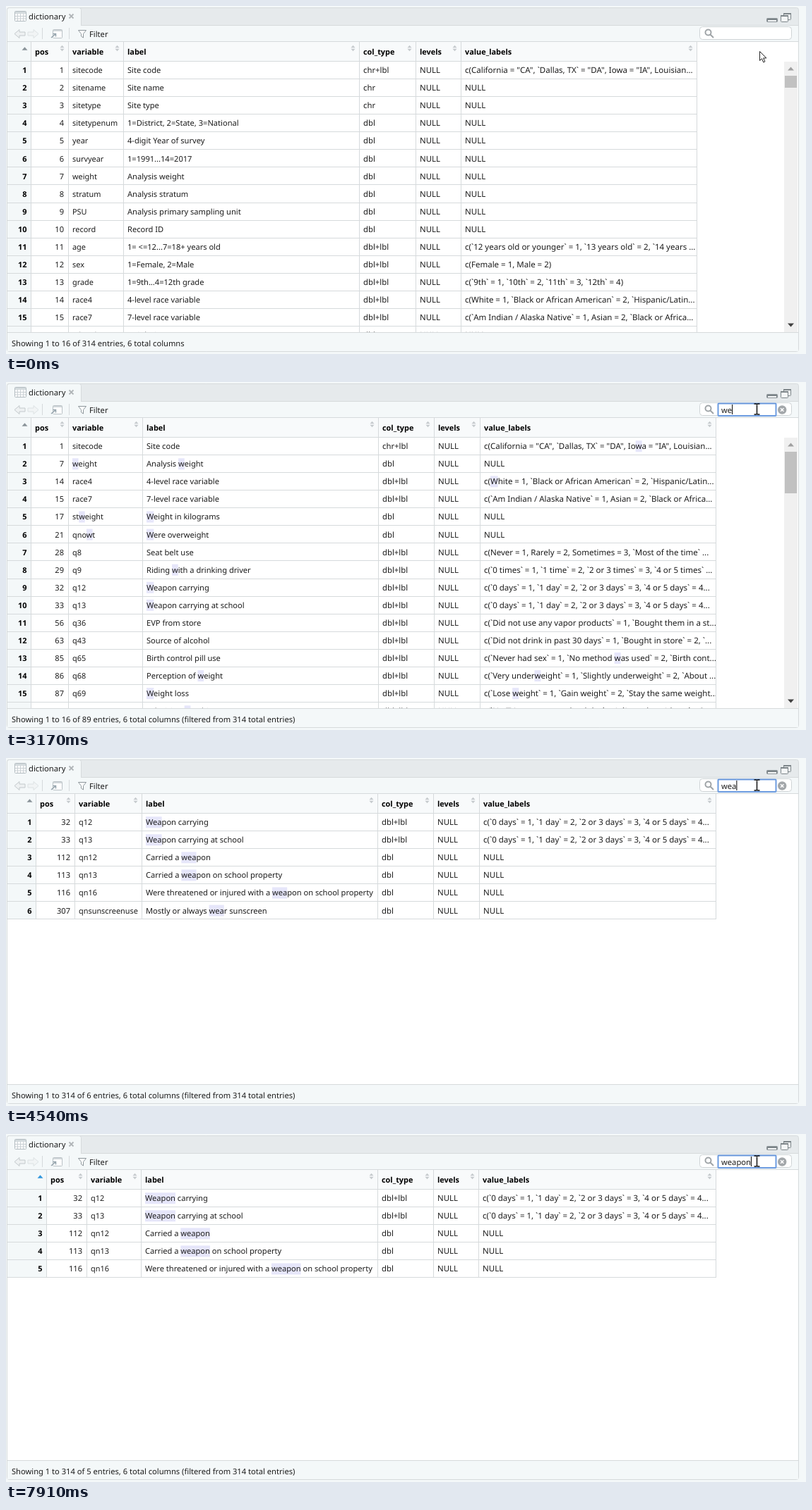
Write an HTML page with a canvas that moves like this. It is 1133x494 px and loops after 8 s.

```html
<!DOCTYPE html>
<html lang="en">
<head>
<meta charset="utf-8">
<title>Filtering a data dictionary</title>
<style>
  html, body { margin: 0; width: 100%; height: 100%; overflow: hidden; background: #f4f8f9; }
  canvas { display: block; }
</style>
</head>
<body>
<canvas id="stage" width="1133" height="494"></canvas>
<script>
const ctx = document.getElementById('stage').getContext('2d');
const LOOP = 8000, ROW = 25.07;
const PANEL = '#f4f8f9', LINE = '#d6dadc', INK = '#1c1c1c';
const HEADINGS = ['', 'pos', 'variable', 'label', 'col_type', 'levels', 'value_labels'];
const SIZES = [10.9, 11.1, 10.9, 11.1, 11.3, 11.4, 11.5];

const DAYS = 'c(`0 days` = 1, `1 day` = 2, `2 or 3 days` = 3, `4 or 5 days` = 4...';
const entries = new Map();
function entry(pos, variable, label, values = 'NULL', type = values === 'NULL' ? 'dbl' : 'dbl+lbl') {
  entries.set(pos, [String(pos), variable, label, type, 'NULL', values]);
}
entry(1, 'sitecode', 'Site code', 'c(California = "CA", `Dallas, TX` = "DA", Iowa = "IA", Louisian...', 'chr+lbl');
entry(2, 'sitename', 'Site name', 'NULL', 'chr');
entry(3, 'sitetype', 'Site type', 'NULL', 'chr');
entry(4, 'sitetypenum', '1=District, 2=State, 3=National');
entry(5, 'year', '4-digit Year of survey');
entry(6, 'survyear', '1=1991...14=2017');
entry(7, 'weight', 'Analysis weight');
entry(8, 'stratum', 'Analysis stratum');
entry(9, 'PSU', 'Analysis primary sampling unit');
entry(10, 'record', 'Record ID');
entry(11, 'age', '1= <=12...7=18+ years old', 'c(`12 years old or younger` = 1, `13 years old` = 2, `14 years ...');
entry(12, 'sex', '1=Female, 2=Male', 'c(Female = 1, Male = 2)');
entry(13, 'grade', '1=9th...4=12th grade', 'c(`9th` = 1, `10th` = 2, `11th` = 3, `12th` = 4)');
entry(14, 'race4', '4-level race variable', 'c(White = 1, `Black or African American` = 2, `Hispanic/Latin...');
entry(15, 'race7', '7-level race variable', 'c(`Am Indian / Alaska Native` = 1, Asian = 2, `Black or Africa...');
entry(16, 'stheight', 'Height in meters');
entry(17, 'stweight', 'Weight in kilograms');
entry(21, 'qnowt', 'Were overweight');
entry(28, 'q8', 'Seat belt use', 'c(Never = 1, Rarely = 2, Sometimes = 3, `Most of the time` ...');
entry(29, 'q9', 'Riding with a drinking driver', 'c(`0 times` = 1, `1 time` = 2, `2 or 3 times` = 3, `4 or 5 times` ...');
entry(32, 'q12', 'Weapon carrying', DAYS);
entry(33, 'q13', 'Weapon carrying at school', DAYS);
entry(56, 'q36', 'EVP from store', 'c(`Did not use any vapor products` = 1, `Bought them in a st...');
entry(63, 'q43', 'Source of alcohol', 'c(`Did not drink in past 30 days` = 1, `Bought in store` = 2, `...');
entry(85, 'q65', 'Birth control pill use', 'c(`Never had sex` = 1, `No method was used` = 2, `Birth cont...');
entry(86, 'q68', 'Perception of weight', 'c(`Very underweight` = 1, `Slightly underweight` = 2, `About ...');
entry(87, 'q69', 'Weight loss', 'c(`Lose weight` = 1, `Gain weight` = 2, `Stay the same weight...');
entry(98, 'q80', 'Television watching', 'c(`No TV on average school day` = 1, `Less than 1 hour` = 2...');
entry(104, 'q86', 'Oral health care', 'c(`During the past 12 months` = 1, `Between 12 and 24 mon...');
entry(112, 'qn12', 'Carried a weapon');
entry(113, 'qn13', 'Carried a weapon on school property');
entry(116, 'qn16', 'Were threatened or injured with a weapon on school property');
entry(117, 'qn17', 'Were in a physical fight');
entry(118, 'qn18', 'Were in a physical fight on school property');
entry(119, 'qn19', 'Were ever physically forced to have sexual');
entry(307, 'qnsunscreenuse', 'Mostly or always wear sunscreen');

const WEAPONS = [32, 33, 112, 113, 116];
const NARROW = [2, 57, 114, 191, 526, 605, 669, 1005];
const views = [
  { at: 0, query: '', total: 314, thumb: 17, edges: [2, 35, 88, 166, 500, 580, 644, 978],
    rows: Array.from({ length: 16 }, (_, i) => i + 1) },
  { at: 2760, query: 'w', total: 89, thumb: 59, edges: [2, 35, 88, 193, 527, 606, 671, 1005],
    rows: [1, 7, 14, 15, 17, 21, 28, 29, 32, 33, 56, 63, 85, 86, 87, 98] },
  { at: 3500, query: 'we', total: 34, thumb: 149, edges: [2, 42, 97, 192, 526, 605, 670, 1005],
    rows: [1, 7, 17, 21, 32, 33, 56, 86, 87, 104, 112, 113, 116, 117, 118, 119] },
  { at: 4540, query: 'wea', total: 6, last: 314, edges: [2, 42, 97, 192, 526, 605, 670, 1005],
    rows: [...WEAPONS, 307] },
  { at: 5520, query: 'weap', total: 5, last: 5, edges: NARROW, rows: WEAPONS },
  { at: 5610, query: 'weap', total: 5, last: 314, edges: NARROW, rows: WEAPONS },
  { at: 6400, query: 'weapo', total: 5, last: 314, edges: NARROW, rows: WEAPONS },
  { at: 7200, query: 'weapon', total: 5, last: 314, edges: NARROW, rows: WEAPONS },
];
const FOCUS = 510, CLEAR_ICON = 2440;
const keyTimes = [2340, 3170, 4210, 5250, 6060, 6880];
const caretToggles = [510, 1040, 1590, 2060, 2340, 2870, 3170, 3740, 4210, 4770, 5250, 5760, 6060, 6590, 6880, 7350, 7910];
const pointerTimes = [70, 160, 250, 340];

const countPast = (times, t) => times.filter(at => at <= t).length;

function box(x, y, w, h, color) {
  ctx.fillStyle = color;
  ctx.fillRect(x, y, w, h);
}

function setFont(size, bold) {
  ctx.font = `${bold ? 'bold ' : ''}${size}px "Noto Sans", "Open Sans", sans-serif`;
}

function text(str, x, y, size = 11.2, { bold = false, align = 'left', color = INK } = {}) {
  setFont(size, bold);
  ctx.textAlign = align;
  ctx.fillStyle = color;
  ctx.fillText(str, x, y);
}

function shape(path, { fill, stroke, width = 1 }) {
  const p = new Path2D(path);
  if (fill) { ctx.fillStyle = fill; ctx.fill(p); }
  if (stroke) { ctx.strokeStyle = stroke; ctx.lineWidth = width; ctx.stroke(p); }
}

function roundBox(x, y, w, h, r, fill, stroke, width = 1) {
  ctx.beginPath();
  ctx.roundRect(x, y, w, h, r);
  ctx.fillStyle = fill;
  ctx.fill();
  ctx.strokeStyle = stroke;
  ctx.lineWidth = width;
  ctx.stroke();
}

function triangle(x, y, w, h, color) {
  shape(`M${x - w / 2} ${y + h / 2}h${w}l${-w / 2} ${-h}z`, { fill: color });
}

function drawChrome() {
  box(0, 0, 1133, 494, PANEL);
  roundBox(1.5, 2.5, 1121, 488, 3, '#e6eaec', LINE);
  box(2, 27, 1120, 463, PANEL);
  box(107, 27, 1015, 1, LINE);
  roundBox(1.5, 2.5, 105, 30, [3, 3, 0, 0], PANEL, LINE);
  box(2, 28, 1120, 22, PANEL);
  box(2, 50, 1120, 1, LINE);

  // Tab icon, title and close mark
  roundBox(12.5, 7.5, 16, 14, 1, '#fff', '#b3bcc1');
  box(13, 8, 15, 3, '#d3dadd');
  shape('M13 14.5h15M13 18h15M16.5 11v10M20.5 11v10M24.5 11v10', { stroke: '#c9d0d4' });
  text('dictionary', 32, 19);
  shape('M89.5 11.5l6 6M95.5 11.5l-6 6', { stroke: '#b0b5b8', width: 1.8 });

  // Toolbar
  shape('M12 39.5l7-6v3.5h8v5h-8v3.5z', { fill: '#eef1f2', stroke: '#c3c9cc' });
  shape('M46 39.5l-7-6v3.5h-8v5h8v3.5z', { fill: '#f1f4f5', stroke: '#dde2e4' });
  box(51, 31, 1, 16, LINE);
  box(89, 31, 1, 16, LINE);
  roundBox(66.5, 33.5, 13, 12, 1, '#fff', '#b9c1c5');
  box(67, 34, 12, 2, '#d2d8db');
  shape('M64 45l6-5M66.5 39.5h4v4', { stroke: '#94a3ac', width: 1.5 });
  shape('M102.5 34.5h11l-4 5v5.5l-3-2v-3.5z', { fill: '#fff', stroke: '#8d969b' });
  text('Filter', 118, 43.5);

  // Pane buttons
  roundBox(1077.5, 17.5, 15, 5, 1, '#7d8589', '#8d9599');
  box(1079, 20, 12, 2, '#f4f6f7');
  roundBox(1101.5, 10.5, 10, 9, 1, '#f4f6f7', '#7d8589');
  box(1101, 10, 11, 2, '#7d8589');
  roundBox(1097.5, 13.5, 10, 9, 1, '#f4f6f7', '#7d8589');
  box(1097, 13, 11, 2, '#7d8589');
}

function drawCell(str, column, left, right, baseline, query) {
  const size = SIZES[column];
  if (column === 1) return text(str, right - 6, baseline, size, { align: 'right' });
  const x = left + 6;
  const start = query ? str.toLowerCase().indexOf(query) : -1;
  if (start >= 0) {
    setFont(size);
    const before = ctx.measureText(str.slice(0, start)).width;
    const match = ctx.measureText(str.slice(start, start + query.length)).width;
    box(x + before, baseline - 12, match, 16, '#e6e6fa');
  }
  text(str, x, baseline, size);
}

function drawTable({ edges, rows, query }) {
  const right = edges[7];
  const bottom = Math.min(463, 78 + rows.length * ROW);
  box(2, 51, 1120, 412, '#fff');
  box(2, 51, right - 2, 27, '#f8fafb');
  box(2, 51, edges[1] - 2, bottom - 51, PANEL);

  ctx.save();
  ctx.beginPath();
  ctx.rect(2, 51, 1120, 412);
  ctx.clip();
  rows.forEach((pos, i) => {
    const baseline = 95.2 + i * ROW;
    text(String(i + 1), edges[1] - 5.5, baseline, SIZES[0], { bold: true, align: 'right', color: '#000' });
    entries.get(pos).forEach((str, c) => drawCell(str, c + 1, edges[c + 1], edges[c + 2], baseline, query));
    box(2, Math.round(78 + (i + 1) * ROW), right - 1, 1, LINE);
  });
  ctx.restore();

  HEADINGS.forEach((name, c) => {
    const end = edges[c + 1], x = end - 8.5;
    text(name, edges[c] + 6, 69, 10.9, { bold: true, color: '#000' });
    if (c) {
      triangle(x, 57.5, 6, 3.5, '#c5cacd');
      triangle(x, 62.5, 6, -3.5, '#c5cacd');
    } else {
      triangle(x, 60.5, 8, 4.5, query.length > 3 ? '#3096dc' : '#8a9399');
    }
    box(end, 51, 1, bottom - 51, LINE);
  });
  box(2, 78, right - 1, 1, LINE);
}

function drawScrollbar(thumb) {
  if (!thumb) return;
  box(1102, 79, 19, 384, '#f0f0f0');
  box(1103, 99, 17, thumb, '#c1c1c1');
  triangle(1111.5, 89, 9, 5, '#a0a0a0');
  triangle(1111.5, 453, 9, -5, '#404040');
}

function drawFooter({ query, total, last = 16 }) {
  box(2, 463, 1120, 27, PANEL);
  box(2, 463, 1120, 1, LINE);
  const filtered = query ? ' (filtered from 314 total entries)' : '';
  text(`Showing 1 to ${last} of ${total} entries, 6 total columns${filtered}`, 8, 482.5, 11.15);
}

function drawSearch(t) {
  roundBox(982.5, 29.5, 130, 18, 4, '#fff', '#cfd4d6');
  shape('M990.5 37.5a4 4 0 1 0 8 0a4 4 0 1 0 -8 0M997.5 40.5l4.5 4.5', { stroke: '#a0a5a8', width: 2 });
  if (t >= FOCUS) roundBox(1008.5, 30.5, 82, 17.5, 1, '#fff', '#6c9be0', 2);
  const typed = 'weapon'.slice(0, countPast(keyTimes, t));
  text(typed, 1013, 44);
  if (countPast(caretToggles, t) % 2) {
    box(1013 + ctx.measureText(typed).width, 32, 1, 14, '#000');
  }
  if (t >= CLEAR_ICON) {
    shape('M1093 39.5a6.2 6.2 0 1 0 12.4 0a6.2 6.2 0 1 0 -12.4 0', { fill: '#a3a7aa' });
    shape('M1097 37.3l4.4 4.4M1101.4 37.3l-4.4 4.4', { stroke: '#fff', width: 1.5 });
  }
}

function drawPointer(t) {
  const travel = countPast(pointerTimes, t) / pointerTimes.length;
  const x = 1067 - 3.5 * travel, y = 64.5 - 26 * travel;
  if (y < 49) {
    shape(`M${x - 4} ${y - 7.5}h3l1 1l1-1h3M${x} ${y - 7}v14M${x - 4} ${y + 7.5}h3l1-1l1 1h3`, { stroke: '#111', width: 1.5 });
  } else {
    shape(`M${x + .5} ${y}v13l3-2.8l2.2 5.2l2.2-1l-2.2-5h4.2z`, { fill: '#fff', stroke: '#222' });
  }
}

function draw(now) {
  const t = now % LOOP;
  const view = views.findLast(v => v.at <= t);
  drawChrome();
  drawTable(view);
  drawScrollbar(view.thumb);
  drawFooter(view);
  drawSearch(t);
  drawPointer(t);
}

ctx.textRendering = 'geometricPrecision';
const start = performance.now();
function tick() {
  draw(performance.now() - start);
  requestAnimationFrame(tick);
}
tick();
</script>
</body>
</html>
```
